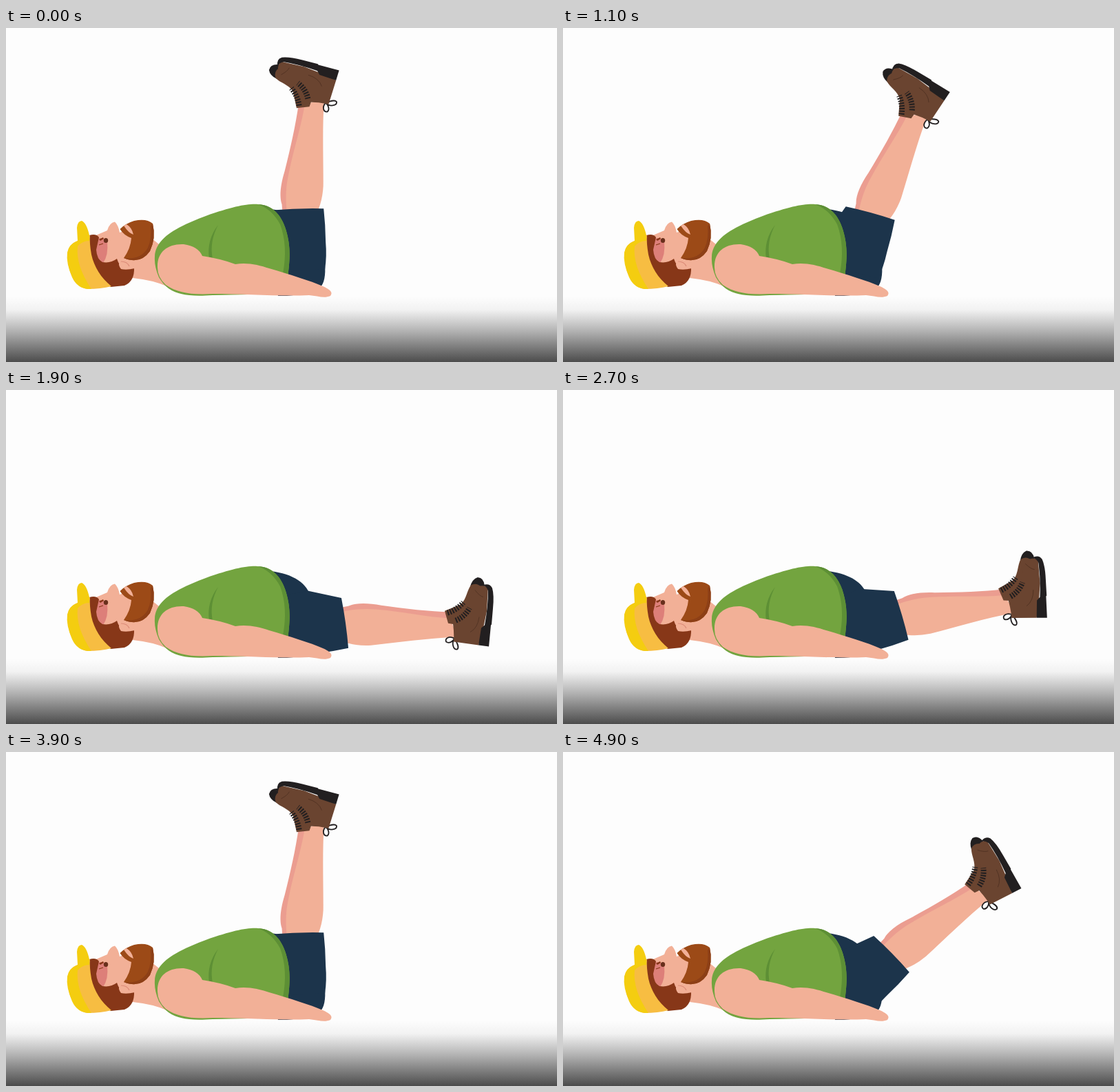
Animation of 800 by 485 pixels, one loop 5 s. Source, as an HTML page:

```html
<!DOCTYPE html>
<html lang="en">
<head>
<meta charset="utf-8">
<title>Leg raise</title>
<style>
  html, body { margin: 0; width: 100%; height: 100%; overflow: hidden; background: #fdfdfd; }
  svg { display: block; width: 100%; height: 100%; }
  .skin { fill: #f2b097; }
  .blush { fill: #eb9d90; }
  .navy { fill: #1c344b; }
  .shirt { fill: #73a43f; }
  .shade { fill: #5d8f35; }
  .boot { fill: #6a4430; }
  .black { fill: #221f20; }
  .hair { fill: #873718; }
  .line { fill: none; stroke: #221f20; stroke-linecap: round; }
  .lace { fill: none; stroke: #221f20; stroke-width: 8; stroke-dasharray: 2 1.8; }
</style>
</head>
<body>
<svg viewBox="0 0 800 485" preserveAspectRatio="none">
  <defs>
    <linearGradient id="floor" x1="0" y1="0" x2="0" y2="1">
      <stop offset="0" stop-color="#fdfdfd"/>
      <stop offset=".2" stop-color="#f2f2f2"/>
      <stop offset=".5" stop-color="#b8b8b8"/>
      <stop offset="1" stop-color="#4c4c4c"/>
    </linearGradient>
  </defs>
  <rect width="800" height="485" fill="#fdfdfd"/>
  <rect y="390" width="800" height="95" fill="url(#floor)"/>

  <!-- hips stay still, the leg turns about the hip joint -->
  <path class="navy" d="M370 262 C408 263 432 276 440 294 L463 342 Q465 368 456 377 Q430 390 395 389Z"/>
  <g id="leg">
    <path class="blush" d="M480 317 L497 314 C507 309 525 309 545 313 C580 318 615 322 645 323 L645 336 L485 332Z"/>
    <path class="skin" d="M478 324 C505 318 522 317 540 319 C575 322 610 330 645 332 L655 359 C610 361 570 367 530 371 Q512 372 497 368 L480 367Z"/>
    <path class="navy" d="M395 300 L438 291.500 L487 302 Q494 338 497 375 Q474 380 449 383 Q428 387 410 386Z"/>
    <g id="foot">
      <path class="line" stroke-width="1.800" d="M653 361 C645 357 639 361 641 366 C645 369 651 366 653 361 C648 369 652 378 657 377 C661 374 656 366 653 361"/>
      <path class="black" d="M676 286 Q679 275 687 272.500 Q696 273 697 285 L690 298Z"/>
      <path class="boot" d="M639 321 L662 312 C671 304 671 292 677 284 Q685 279 693 287 L698 310 L660 342 L644 339Z"/>
      <path class="boot" d="M650 334 L669 320 C678 310 676 298 683 290 Q691 281 702 287 L700 322 L695 346 L688 371 L652 366 Q653 350 650 334Z"/>
      <path class="black" d="M694 284 Q704 280 708 288 Q711 298 709 318 L707 341 L706 342 L703 373 L688 371 L692 346 L697 342 Q702 315 702 292 Q700 285 694 284Z"/>
      <path class="lace" d="M643 324 Q656 320 666 309"/>
      <path class="lace" d="M655 335 Q668 330 675 317"/>
      <path fill="none" stroke="#4f3122" stroke-width=".8" d="M676 352 Q687 346 689 330 M683 291 Q690 300 695 301"/>
    </g>
  </g>

  <!-- neck and face -->
  <path class="skin" d="M126 303 L147 294 Q150 283 158 281.500 Q163 286 165 297 L190 288 L222 314 L236 376 Q214 366 184 363 L165 356 L132 345Z"/>
  <path d="M131 307 Q139 302 147 310 Q149 330 141 341 Q131 341 129 326Z" fill="#dd7f79"/>
  <path class="hair" d="M121 301 Q131 298 135 304 L131 322 Q132 336 140 340 Q152 342 161 335 Q164 346 174 350 L186 347 Q187 368 172 374 L152 376 Q126 360 121 325Z"/>
  <path class="skin" d="M187 349 Q183 340 183 337 Q173 333 165 337 Q162 344 167 350 Q175 352 187 349Z"/>
  <path d="M167 339 Q176 339 179 346" fill="none" stroke="#dc8d79" stroke-width="1.200"/>
  <path class="hair" d="M135 307 L141 304 L142 306 L137 309Z"/>
  <ellipse cx="145" cy="308.500" rx="3.200" ry="3.500" fill="#69301c"/>
  <path fill="none" stroke="#873718" stroke-width="1.200" d="M135 315 L141 313"/>
  <path d="M171 334 Q181 320 182 305 Q171 301 165.500 292 Q173 284 186 280 Q204 276 213 284 Q218 305 209 324 Q195 344 171 334Z" fill="#9c4a17"/>
  <path d="M213 284 Q218 305 209 324 Q195 344 171 334 Q196 337 206 319 Q212 305 210 288Z" fill="#8d3f16"/>
  <path class="skin" d="M171 287 L175 285 Q183 290 185 300 Q178 298 171 287Z"/>

  <!-- cap -->
  <path d="M104 309 Q90 314 89 330 C90 355 100 376 118 379 Q138 379 153 375 C138 363 128 347 124 329 Q121 312 122 301Z" fill="#f7bd42"/>
  <path d="M103 290 Q104 280 110 280 Q117 283 121 301 L121 309 Q111 309 104 317 Q101 345 124 379 Q104 380 96 362 Q87 341 89 326 Q91 314 104 309Z" fill="#f4cd10"/>

  <!-- trunk -->
  <path class="shirt" d="M216 332 C217 306 245 290 290 273 C330 259 350 255 366 256 C391 257 404 278 409 303 C414 326 411 345 408 372 L404 386 L300 388 C258 391 236 386 222 362 Q215 346 216 332Z"/>
  <path class="shade" d="M366 256 C391 257 404 278 409 303 C414 326 411 345 409 362 L402 357 C407 330 406 307 398 285 Q386 263 366 256Z"/>
  <path class="shade" d="M308 286 Q291 308 295 335 L300 335 Q295 310 308 286Z"/>
  <path class="skin" d="M220 348 C219 325 235 313 258 314 Q279 317 285 331 Q312 335 333 343 C350 340 367 344 382 349 C412 358 442 367 460 375 C471 380 475 384 471 389 C462 393 452 389 440 388 C400 390 345 386 300 386 C270 388 247 384 232 373 Q220 362 220 348Z"/>
</svg>
<script>
  const LOOP = 5000, STEP = 100;
  const REP = 3634, FALL = 1243, RISE = 2940;  // one repetition, and the middle of each swing
  const REACH = 1030, POWER = 6;               // half length and sharpness of a swing
  const RAISED = -84;                          // degrees from lying flat
  const leg = document.getElementById('leg');
  const foot = document.getElementById('foot');

  // Ease in and out, half done at x = 0
  function swing(x) {
    const rest = Math.max(0, 1 - Math.abs(x) / REACH) ** POWER / 2;
    return x < 0 ? rest : 1 - rest;
  }

  function draw() {
    const t = Math.floor(performance.now() % LOOP / STEP) * STEP % REP;
    const turn = RAISED * (1 - swing(t - FALL) + swing(t - RISE));
    leg.setAttribute('transform', `rotate(${turn} 416.5 338.5)`);
    foot.setAttribute('transform', `translate(-2 0) rotate(${-0.04 * turn} 646 341)`);
    requestAnimationFrame(draw);
  }
  draw();
</script>
</body>
</html>
```
